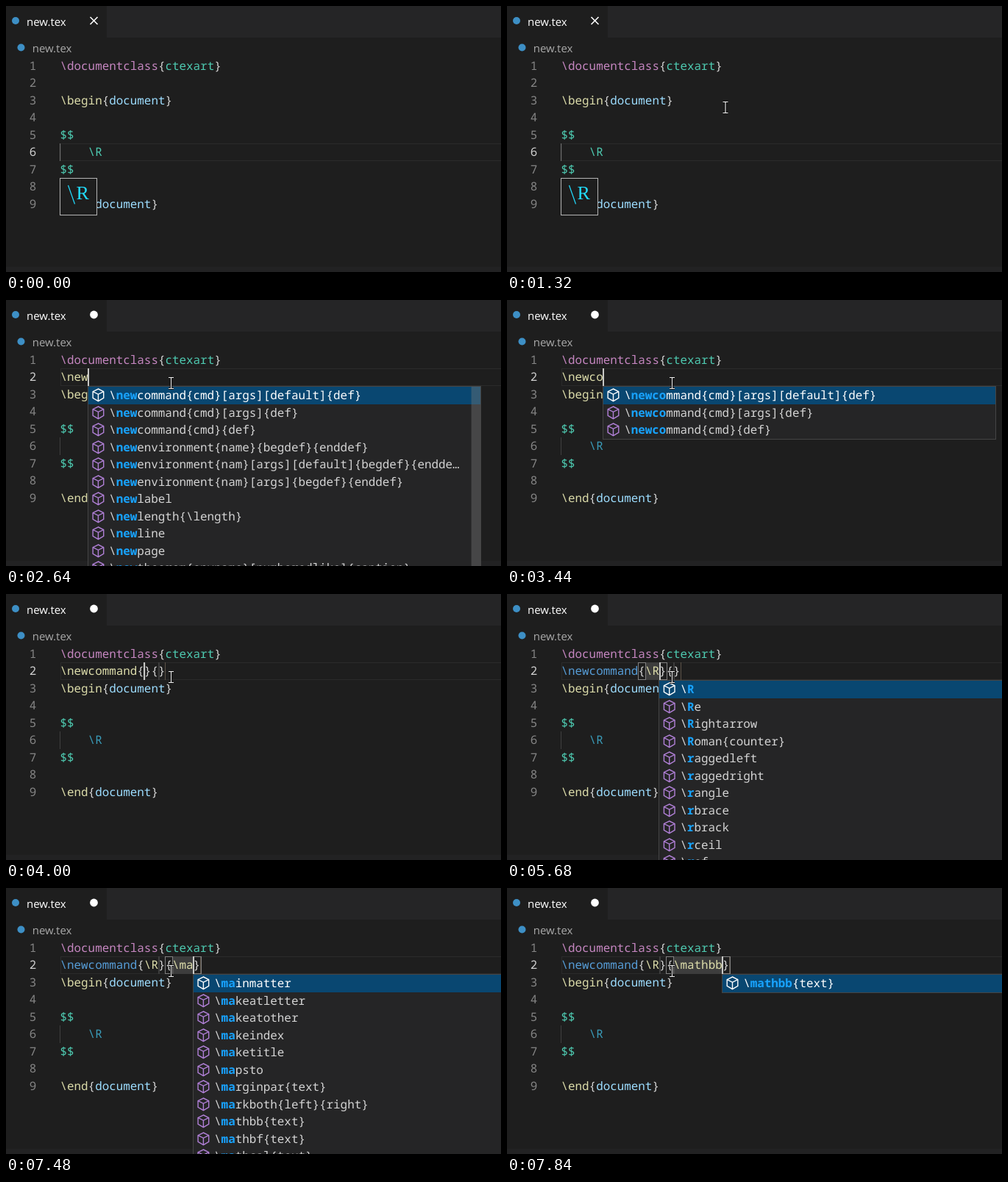
These frames come from a looping animation (673x362 px, 8 s). An HTML page with a canvas:

```html
<!DOCTYPE html>
<html lang="en">
<head>
<meta charset="utf-8">
<title>Editor completion</title>
<style>
  html, body { margin: 0; width: 100%; height: 100%; overflow: hidden; background: #1e1e1e; }
  canvas { display: block; }
</style>
</head>
<body>
<canvas id="stage" width="673" height="362"></canvas>
<script>
const ctx = document.getElementById('stage').getContext('2d', { alpha: false });
ctx.textRendering = 'geometricPrecision';

const LOOP = 8000, W = 673, H = 362;
const LEFT = 73.5, CHAR = 9.53, LINE = 23.5, TOP = 70, POPUP_Y = 117, POPUP_W = 534;
const PLAIN = '#d4d4d4', YELLOW = '#dcdcaa', BLUE = '#569cd6', TEAL = '#4ec9b0',
      PINK = '#c586c0', SKY = '#9cdcfe', GREY = '#858585', DIM_R = '#3a9bb8';

const POOL = String.raw`\( abstract \abstractname{name} \acute \addcontentsline{file}{secunit}{entry} \aleph
  align align* aligned alignedat alltt
  \nabla \natural \nearrow \neg \neq
  \newcommand{cmd}[args][default]{def} \newcommand{cmd}[args]{def} \newcommand{cmd}{def}
  \newenvironment{name}{begdef}{enddef} \newenvironment{nam}[args][default]{begdef}{endde…
  \newenvironment{nam}[args]{begdef}{enddef} \newlabel \newlength{\length} \newline \newpage
  \newtheorem{envname}[numberedlike]{caption}
  \R \Re \Rightarrow \Roman{counter} \raggedleft \raggedright \rangle \rbrace \rbrack \rceil \ref
  \mainmatter \makeatletter \makeatother \makeindex \maketitle \mapsto \marginpar{text} \markboth{left}{right}
  \mathbb{text} \mathbf{text} \mathcal{text} \mathfrak{text} \mathit{text} \mathnormal{text}
  \mathring{text} \mathrm{text} \mathscr{text} \mathsf{text} \mathtt{text}`.split(/\s+/);

// Each step adds to the state before it.
const STEPS = [
  [0, { line: 6, cmd: '', field: 0, args: null, query: '', pick: 0, boxed: 0, dirty: false }],
  [1640, { line: 2 }],
  [2080, { cmd: '\\', query: '\\', dirty: true }],
  [2520, { cmd: '\\n', query: '\\n' }],
  [2600, { cmd: '\\ne', query: '\\ne' }],
  [2640, { cmd: '\\new', query: '\\new' }],
  [2800, { cmd: '\\newc', query: '\\newc' }],
  [2840, { cmd: '\\newco', query: '\\newco' }],
  [3760, { pick: 1 }],
  [3800, { pick: 2 }],
  [4000, { cmd: '\\newcommand', args: ['', ''], field: 1, query: '', pick: 0 }],
  [4040, { boxed: 1 }],
  [5360, { args: ['\\', ''], query: '\\' }],
  [5680, { args: ['\\R', ''], query: '\\R' }],
  [5840, { query: '' }],
  [5960, { field: 2 }],
  [6120, { boxed: 2 }],
  ...[7240, 7400, 7480, 7560, 7640, 7720, 7840].map((time, i) => {
    const typed = '\\mathbb'.slice(0, i + 1);
    return [time, { args: ['\\R', typed], query: typed }];
  })
];
const CARET_OFF = [[0, 1640], [1880, 2080], [2360, 2520], [3160, 3440], [3720, 4000], [4280, 4600],
                   [4920, 5200], [5640, 5680], [6400, 6720], [7000, 7240]];

const columnX = col => LEFT + col * CHAR;
const lineY = n => Math.floor(TOP + (n - 1) * LINE);
const rowY = i => Math.round(POPUP_Y + 1 + i * LINE);

function rect(x, y, w, h, color) {
  ctx.fillStyle = color;
  ctx.fillRect(x, y, w, h);
}

function frame(x, y, w, h, color) {
  ctx.strokeStyle = color;
  ctx.lineWidth = 1;
  ctx.strokeRect(Math.round(x) + .5, Math.round(y) + .5, Math.round(w), Math.round(h));
}

function path(points, color, width) {
  ctx.strokeStyle = color;
  ctx.lineWidth = width;
  ctx.beginPath();
  points.forEach(([x, y], i) => i ? ctx.lineTo(x, y) : ctx.moveTo(x, y));
  ctx.stroke();
}

function disc(x, y, r, color) {
  ctx.fillStyle = color;
  ctx.beginPath();
  ctx.arc(x, y, r, 0, 7);
  ctx.fill();
}

function mono(text, x, y, color, weight = 500, advance = CHAR) {
  ctx.font = `${weight} ${advance / .6}px "Noto Sans Mono", monospace`;
  ctx.fillStyle = color;
  for (const c of text) {
    ctx.fillText(c, x, y);
    x += advance;
  }
  return x;
}

function label(text, x, y, color) {
  ctx.font = '15px "Open Sans", sans-serif';
  ctx.fillStyle = color;
  ctx.fillText(text, x, y);
}

// parts: text and colour in turn
function code(n, col, ...parts) {
  let x = columnX(col);
  for (let i = 0; i < parts.length; i += 2) x = mono(parts[i], x, lineY(n) + 17, parts[i + 1]);
}

function header(dirty) {
  rect(137, 0, W - 137, 43, '#252526');
  disc(13, 20, 5, '#3d8fc5');
  disc(20.5, 56.5, 5, '#3d8fc5');
  label('new.tex', 28, 27, '#fff');
  label('new.tex', 35.7, 63, '#a9a9a9');
  if (dirty) disc(119.5, 20, 5.4, '#fff');
  else {
    path([[114.5, 15], [124.5, 25]], '#fff', 1.6);
    path([[124.5, 15], [114.5, 25]], '#fff', 1.6);
  }
}

function sourceLines(line) {
  frame(LEFT, lineY(line), W, 23, '#2b2b2b');
  for (let n = 1; n <= 9; n++)
    mono(String(n), 31.7, lineY(n) + 17, n === line ? '#d0d0d0' : GREY);
  code(1, 0, '\\documentclass', PINK, '{', PLAIN, 'ctexart', TEAL, '}', PLAIN);
  code(3, 0, '\\begin', YELLOW, '{', PLAIN, 'document', SKY, '}', PLAIN);
  code(5, 0, '$$', TEAL);
  rect(73, lineY(6), 1, 24, line === 6 ? '#707070' : '#404040');
  code(6, 4, '\\R', line === 6 ? TEAL : DIM_R);
  code(7, 0, '$$', TEAL);
  code(9, 0, '\\end', YELLOW, '{', PLAIN, 'document', SKY, '}', PLAIN);
}

function commandLine({ cmd, args, field, boxed }) {
  const y = lineY(2);
  if (!args) {
    code(2, 0, cmd, cmd === '\\' ? PLAIN : YELLOW);
    return cmd.length;
  }
  const [a, b] = args;
  const start = [cmd.length + 1, cmd.length + a.length + 3];
  const end = [start[0] + a.length, start[1] + b.length];
  args.forEach((text, i) => {
    const active = field === i + 1 && text;
    const x = columnX(active ? start[i] : end[i]);
    rect(x, y, active ? text.length * CHAR : 2, 24, '#3d3d3d');
  });
  rect(Math.round(columnX(end[1] + 1)), y, 1, 24, '#5c5348');
  if (boxed)
    for (const col of [start[boxed - 1] - 1, end[boxed - 1]])
      frame(columnX(col), y, CHAR, 23, '#808080');
  code(2, 0, cmd, a ? BLUE : YELLOW, '{', PLAIN, a, YELLOW, '}{', PLAIN, b, YELLOW, '}', PLAIN);
  return field === 1 ? end[0] : end[1];
}

function cube(x, y, color) {
  path([[x, y - 8.3], [x + 7.3, y - 4.7], [x + 7.3, y + 4], [x, y + 8.3], [x - 7.3, y + 4], [x - 7.3, y - 4.7],
        [x, y - 8.3], [x + 7.3, y - 4.7]], color, 1.4);
  path([[x - 7.3, y - 4.7], [x, y - 1], [x + 7.3, y - 4.7]], color, 1.4);
  path([[x, y - 1], [x, y + 8.3]], color, 1.4);
}

function snippet(x, y) {
  path([[x - 7.5, y + 7], [x - 7.5, y - 8], [x + 7.5, y - 8], [x + 7.5, y + 7]], PLAIN, 1.4);
  ctx.setLineDash([2, 1.5]);
  path([[x - 8, y + 7.5], [x + 8, y + 7.5]], PLAIN, 1.4);
  ctx.setLineDash([]);
}

function matches(query) {
  if (query === '\\') return POOL.slice(0, 11);
  return POOL.filter(s => s.toLowerCase().startsWith(query.toLowerCase())).slice(0, 11);
}

function popup(query, pick, x) {
  const items = matches(query);
  const height = rowY(items.length) - POPUP_Y + 1;
  const typed = Math.max(1, query.length);
  rect(x, POPUP_Y, POPUP_W, height, '#252526');
  items.forEach((item, i) => {
    const y = rowY(i), on = i === pick;
    const color = on ? '#fff' : PLAIN;
    if (on) rect(x, y, POPUP_W, rowY(i + 1) - y, '#094771');
    if (item[0] === '\\') cube(x + 13.8, y + 11.3, on ? '#fff' : '#b180d7');
    else snippet(x + 14.3, y + 11.8);
    let tx = mono(item.slice(0, 1), x + 28.5, y + 17, color);
    tx = mono(item.slice(1, typed), tx, y + 17, '#18a3ff', 700);
    mono(item.slice(typed), tx, y + 17, color);
    if (item === '\\(') mono('inline math \\( ... \\)', x + 351.5, y + 16, '#b8c9d6', 500, 8.07);
  });
  if (query.startsWith('\\n') && items.length > 10)
    rect(x + POPUP_W - 13, POPUP_Y + 1, 13, H, 'rgba(121,121,121,.4)');
  frame(x - .5, POPUP_Y, POPUP_W, height - 1, '#454545');
}

function preview() {
  rect(73, 234, 51, 51, '#1e1e1e');
  frame(73, 234, 50, 50, '#b4b4b4');
  path([[84.5, 244], [93.5, 269.5]], '#22dcff', 1.2);
  ctx.font = '26px "Liberation Serif", serif';
  ctx.fillStyle = '#22dcff';
  ctx.fillText('R', 95.5, 263);
}

function pointer(t) {
  if (t < 1120) return;
  const p = Math.min(1, (Math.floor((t - 1120) / 40) + 1) / 12);
  const rest = (1 - p) ** 2;
  const x = 224.5 + 290 * rest, y = 113 + 100 * rest;
  for (const [color, width] of [['#000', 3], ['#eee', 1.2]]) {
    path([[x, y - 7.5], [x, y + 7.5]], color, width);
    for (const end of [-7.5, 7.5]) path([[x - 3.5, y + end], [x + 3.5, y + end]], color, width);
  }
}

function draw(t) {
  const state = Object.assign({}, ...STEPS.filter(([time]) => time <= t).map(([, change]) => change));
  rect(0, 0, W, H, '#1e1e1e');
  rect(0, 355, W, 7, '#222223');
  header(state.dirty);
  sourceLines(state.line);
  const caretX = columnX(commandLine(state));
  if (!CARET_OFF.some(([from, to]) => t >= from && t < to))
    rect(Math.round(caretX - .4), lineY(2), 2, 24, '#c8c8c6');
  if (state.line === 6) preview();
  if (state.query) popup(state.query, state.pick, caretX);
  pointer(t);
}

function tick() {
  draw(performance.now() % LOOP);
  requestAnimationFrame(tick);
}
tick();
</script>
</body>
</html>
```
